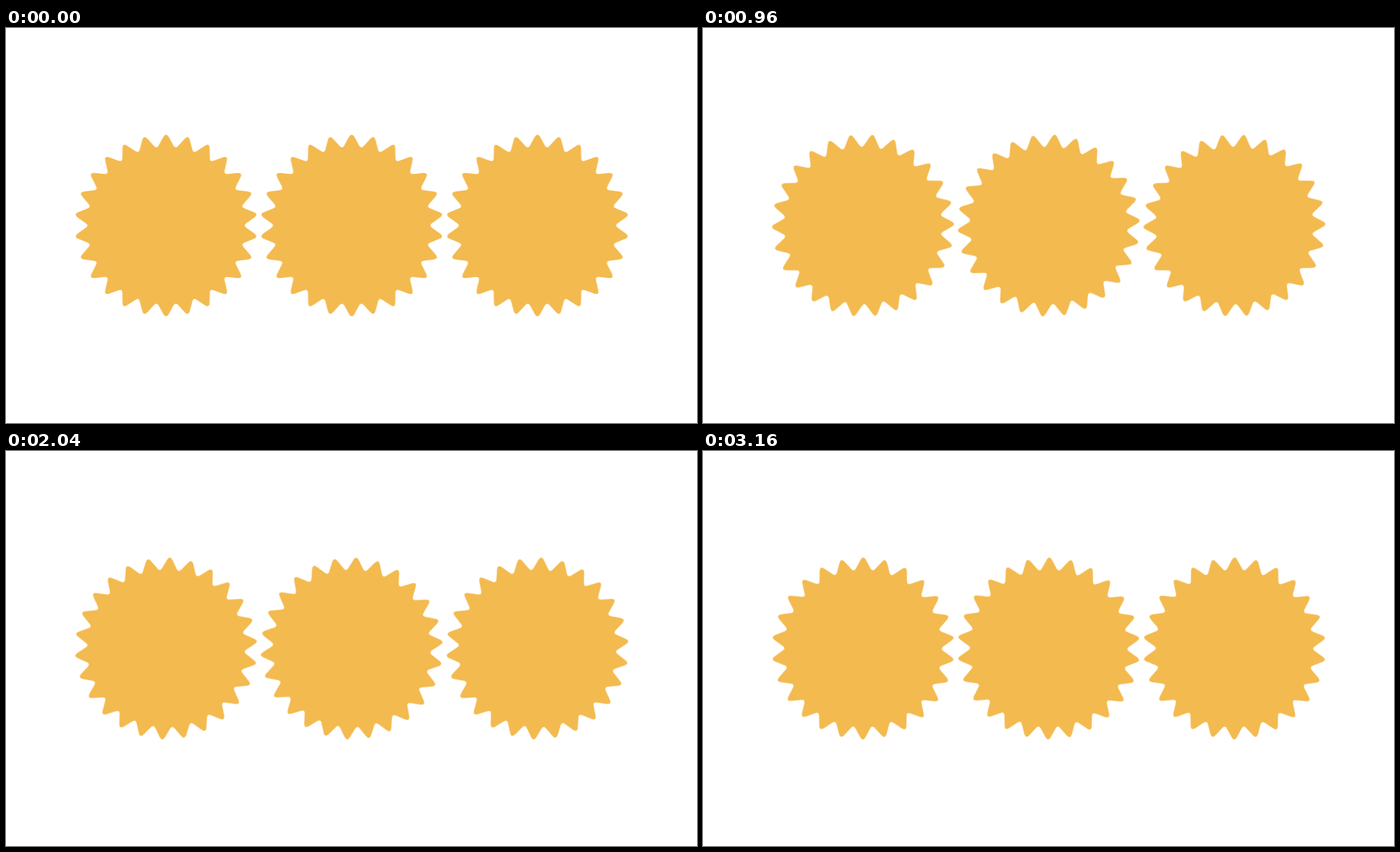
These frames come from a looping animation (990 by 566 pixels, 3.2 s). An HTML page:

```html
<!DOCTYPE html>
<html lang="en">
<head>
<meta charset="utf-8">
<title>Three turning gears</title>
<style>
  html, body { margin: 0; width: 100%; height: 100%; overflow: hidden; background: #fff; }
  svg { display: block; width: 990px; height: 566px; }
  .gear { fill: #f3ba4f; animation: cw 3200ms steps(80) -1ms infinite; }
  .gear.back { animation-name: ccw; }
  @keyframes cw { from { transform: rotate(0deg); } to { transform: rotate(112.32deg); } }
  @keyframes ccw { from { transform: rotate(0deg); } to { transform: rotate(-125.78deg); } }
</style>
</head>
<body>
<svg viewBox="0 0 990 566">
  <g transform="translate(229.3 283)"><path class="gear"/></g>
  <g transform="translate(495.3 283)"><path class="gear back"/></g>
  <g transform="translate(761.4 283)"><path class="gear"/></g>
</svg>
<script>
  const TEETH = 26, OUTER = 134, INNER = 110.5;
  const TIP_ROUND = 0.3, VALLEY_ROUND = 0.2;

  // Corners alternate between tip (even) and valley (odd), starting at the top.
  const corner = i => {
    const a = i * Math.PI / TEETH, r = i % 2 ? INNER : OUTER;
    return [r * Math.sin(a), -r * Math.cos(a)];
  };
  const mix = (p, q, k) => p.map((v, j) => v + (q[j] - v) * k);
  const str = p => p.map(v => v.toFixed(2)).join(' ');

  let d = '';
  for (let i = 0; i < 2 * TEETH; i++) {
    const k = i % 2 ? VALLEY_ROUND : TIP_ROUND;
    const c = corner(i);
    const start = mix(c, corner(i + 2 * TEETH - 1), k);
    const end = mix(c, corner(i + 1), k);
    d += `${i ? 'L' : 'M'}${str(start)}Q${str(c)} ${str(end)}`;
  }
  for (const gear of document.querySelectorAll('.gear')) gear.setAttribute('d', d + 'Z');
</script>
</body>
</html>
```
